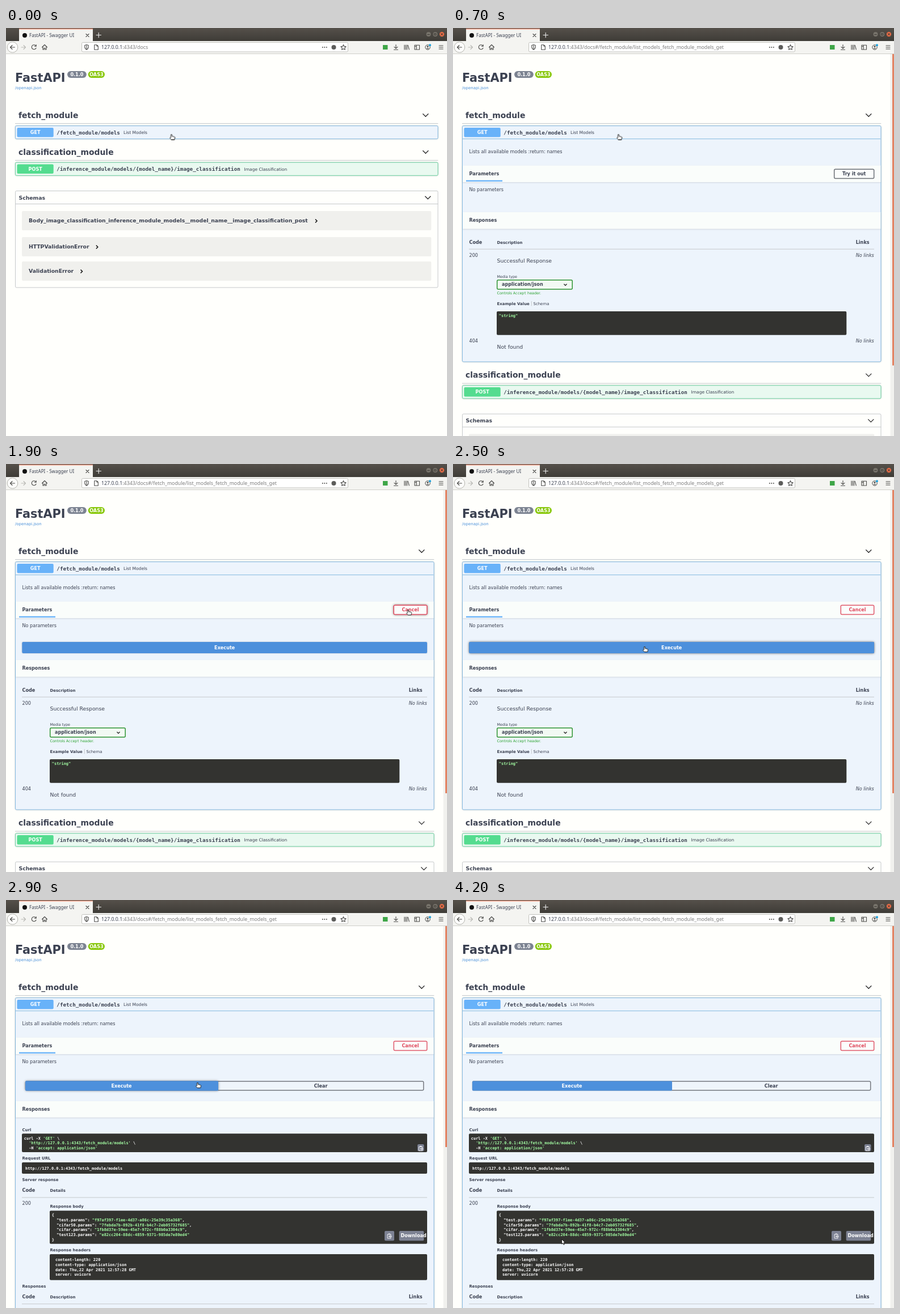
An HTML page that plays this animation: 777 by 720 pixels, repeating every 4400 ms.

```html
<!DOCTYPE html>
<html lang="en">
<head>
<meta charset="utf-8">
<title>API docs</title>
<style>
html, body { margin: 0; width: 100%; height: 100%; overflow: hidden; background: #fffffc; }
svg { display: block; width: 777px; height: 720px; }
text { font: 8.1px "DejaVu Sans", sans-serif; fill: #3b4151; white-space: pre; }
.b { font-weight: bold; }
.i { font-style: italic; }
.m { font-family: "DejaVu Sans Mono", monospace; font-weight: bold; }
.c { text-anchor: middle; }
.ui { font-family: "Noto Sans", "Open Sans", sans-serif; }
.w { fill: #fff; }
.g { fill: #a2fca2; }
.dim { fill: #7d7d7d; }
.link { fill: #4a90d9; }
.red { fill: #e0485c; }
.ok { fill: #27a02b; }
.line { fill: none; stroke: #2b2b2b; stroke-width: 1.3; }
.icon { fill: none; stroke: #4a4a48; stroke-width: 1.1; stroke-linecap: round; stroke-linejoin: round; }
.soft { filter: drop-shadow(0 0 1px rgba(0,0,0,.2)); }
.band { filter: drop-shadow(0 1px 1px rgba(0,0,0,.12)); }
.hover { filter: drop-shadow(0 0 2px rgba(0,0,0,.45)); }
.timed { animation: 4400ms step-end infinite; }
#hand, #arrow { fill: #fff; stroke: #111; stroke-width: .9; stroke-linejoin: round; }
</style>
</head>
<body>
<svg id="stage" viewBox="0 0 777 720" xmlns="http://www.w3.org/2000/svg"></svg>
<script>
const LOOP = 4400;
const INK = '#3b4151', RULE = '#c5c8cb', DARK = '#333330', SLATE = '#7d8293';
const GET = { box: '#edf4fc', edge: '#83b9e0', tag: '#68b2f9' };
const POST = { box: '#e9f9f0', edge: '#6bcfa0', tag: '#54dc8f' };
let css = '';

// Keyframes from [time, declarations] pairs, held until the next one
function keys(name, steps) {
  const rows = steps.map(([t, rule]) => `${Math.max(0, t - .01) / LOOP * 100}%{${rule}}`);
  css += `@keyframes ${name}{${rows.join('')}}`;
  return `class="timed" style="animation-name:${name}"`;
}
let count = 0;
function during(from, to, body) {
  const steps = [[from, 'visibility:visible'], [to, 'visibility:hidden']];
  if (from) steps.unshift([0, 'visibility:hidden']);
  return `<g ${keys('show' + count++, steps)}>${body}</g>`;
}
const text = (x, y, s, size = 8.1, cls = '') =>
  `<text x="${x}" y="${y}" class="${cls}" style="font-size:${size}px">${s}</text>`;
const span = (cls, s) => `<tspan class="${cls}">${s}</tspan>`;
const box = (x, y, x2, y2, fill, edge = 'none', rx = 0, cls = '', sw = 1) =>
  `<rect x="${x}" y="${y}" width="${x2 - x}" height="${y2 - y}" rx="${rx}" fill="${fill}" stroke="${edge}" stroke-width="${sw}" class="${cls}"/>`;
const path = (d, cls = 'line', extra = '') => `<path d="${d}" class="${cls}" ${extra}/>`;
const rule = (x, x2, y, color = RULE) => path(`M${x} ${y}H${x2}`, '', `stroke="${color}"`);
const dot = (x, y, r, fill, extra = '') => `<circle cx="${x}" cy="${y}" r="${r}" fill="${fill}" ${extra}/>`;
const shift = (y, body) => `<g transform="translate(0 ${y})">${body}</g>`;
const down = (x, y, r = 5) => path(`M${x - r} ${y - r / 2}l${r} ${r} ${r} ${-r}`);
const right = (x, y) => path(`M${x - 1.5} ${y - 3}l3 3-3 3`, 'line', 'style="stroke:#111;stroke-width:1.5"');

function chrome() {
  const tools = [
    'M15.5 34H8M11 30.5L7.5 34 11 37.5',
    'M52.6 31.5A4 4 0 1 0 53 35.2M53.2 29.5V32.3H50.3',
    'M63.5 34L68 29.5 72.5 34M65 33.5V38H67V35.5H69V38H71V33.5',
    'M138.8 30.5L142 29.5 145.2 30.5V33.5Q145 36.8 142 38.3 139 36.8 138.8 33.5ZM142 31V36.8',
    'M155.8 29.8H160L162.3 32V38.2H155.8ZM160 29.8V32H162.3',
    'M594.5 29.5l1.4 2.9 3.2.4-2.3 2.2.6 3.2-2.9-1.5-2.9 1.5.6-3.2-2.3-2.2 3.2-.4z',
    'M687 29.5V36M684 33.3L687 36.2 690 33.3M683.5 38.3H690.5',
    'M702 30V38M704.3 30V38M706.6 30V38M708.2 30.3L710.3 38',
    'M720 30.2H728.5V38H720ZM723.2 30.2V38M720.5 32.5H722.5',
    'M763 31H770M763 34H770M763 37H770'
  ];
  return '<defs><linearGradient id="bar" x2="0" y2="1"><stop stop-color="#55504a"/><stop offset="1" stop-color="#3d3b36"/></linearGradient></defs>'
    + box(0, 0, 777, 24, 'url(#bar)')
    + box(0, 23, 777, 45.5, '#f4f4f1') + rule(0, 777, 45.5, '#cfcfca')
    + box(23, 1, 153, 25, '#f4f4f1') + box(23, 1, 153, 2.5, '#ec9a83')
    + dot(33, 13, 4, '#111') + text(41, 16, 'FastAPI - Swagger UI', 8.1, 'ui')
    + path('M141 10.5l5 5M146 10.5l-5 5', 'icon')
    + path('M159 12.5H167.5M163.2 8.3V16.7', 'icon', 'style="stroke:#eee"')
    + dot(744.5, 11, 4, '#77736b') + dot(756.3, 11, 4, '#77736b') + dot(768, 11, 4.2, '#df6a47')
    + path('M742.7 11.5H746.3M754.8 9.7H757.8V12.5H754.8ZM766.5 9.5l3 3M769.5 9.5l-3 3', 'icon', 'style="stroke:#37342f;stroke-width:.9"')
    + dot(11.5, 34, 9.3, '#fdfdfb', 'stroke="#b4b4af"')
    + box(133.5, 25.5, 602.5, 42, '#fff', '#c3c3be', 2)
    + tools.map(d => path(d, 'icon')).join('')
    + path('M27 34H34.5M31 30.5L34.5 34 31 37.5', 'icon', 'style="stroke:#b9b9b5"')
    + [557.8, 561.3, 564.8].map(x => dot(x, 34, 1, '#4a4a48')).join('')
    + dot(577.5, 34, 4, '#5c5c5a')
    + box(664, 30, 672.5, 38, '#3fa648')
    + dot(743, 34, 4.2, 'none', 'stroke="#4a4a48"') + dot(743, 32.8, 1.5, '#4a4a48')
    + path('M740.3 36.8Q743 33.8 745.7 36.8Z', '', 'fill="#4a4a48"') + dot(747, 30.2, 2, '#1aa0dc');
}

const url = tail => text(168, 37.2, '127.0.0.1' + span('dim', ':4343/docs' + tail), 8.8, 'ui');

function title() {
  return text(16, 94.8, 'FastAPI', 20.85, 'b')
    + box(108, 76, 141.8, 88, '#7d8492', 'none', 6) + text(124.9, 85.1, '0.1.0', 8.1, 'b c w')
    + box(144.7, 76, 174, 88, '#89c80c', 'none', 6) + text(159.4, 85.1, 'OAS3', 8.1, 'b c w')
    + text(16, 108.4, '/openapi.json', 6.95, 'link');
}

function section(y, name, edge) {
  return text(22, y, name, 13.92, 'b') + down(edge - 22, y - 5) + rule(16, edge, y + 9.7);
}

function operation(y, end, edge, kind, verb, route, about, aboutX) {
  return box(16.5, y, edge - .3, end, kind.box, kind.edge, 2, 'soft')
    + box(19.5, y + 3.3, 83.7, y + 19.8, kind.tag, 'none', 2)
    + text(51.7, y + 14.5, verb, 8.1, 'b c w')
    + text(89.3, y + 14.8, route, 9.27, 'm') + text(aboutX, y + 14.4, about, 7.53);
}

function head(edge, end) {
  return section(158.8, 'fetch_module', edge)
    + operation(172.7, end, edge, GET, 'GET', '/fetch_module/models', 'List Models', 207)
    + (end > 200 ? rule(17, edge - 1, 195.7, GET.edge) : '');
}

function lower(dy, edge) {
  const models = [
    [323, 'Body_image_classification_inference_module_models__model_name__image_classification_post', 546.5],
    [369, 'HTTPValidationError', 160.3],
    [412, 'ValidationError', 133]
  ];
  return shift(dy, section(223.8, 'classification_module', edge)
    + operation(237.2, 260.3, edge, POST, 'POST', '/inference_module/models/{model_name}/image_classification', 'Image Classification', 419.5)
    + box(16.5, 287.5, edge - .3, 458, 'none', RULE, 2) + rule(17, edge, 310.5)
    + text(22.5, 302.6, 'Schemas', 9.27, 'b') + down(edge - 18, 299.3)
    + models.map(([y, name, x]) => box(28, y, edge - 12, y + 34, '#f0f0ed', 'none', 2)
      + text(40, y + 20.3, name, 9.27, 'b') + right(x, y + 17.5)).join(''));
}

const band = (y, y2) => box(17, y, 753.5, y2, '#fafdfb', 'none', 0, 'band');
const button = (x, label, edge, cls) => box(x, 249.2, 741.7, 265.5, '#fbfdfc', edge, 2, '', 1.5)
  + text((x + 741.7) / 2, 260, label, 8.1, 'b c ' + cls);
const scroll = end => box(770.5, 46, 777, 720, '#f1f1ee') + box(774, 46, 777, end, '#e38363');

function details() {
  return text(28.5, 220.5, 'Lists all available models :return: names')
    + band(242.7, 272) + text(28.5, 259.7, 'Parameters', 8.1, 'b')
    + box(23, 268.6, 87, 270.9, GET.tag) + text(28.5, 288, 'No parameters');
}

function columns(y) {
  return text(28.5, y, 'Code', 8.1, 'b') + text(77.5, y - .1, 'Description', 6.95, 'b')
    + text(709.7, y, 'Links', 8.1, 'b') + rule(28, 742, y + 9.5);
}

function responses(dy) {
  return shift(dy, band(325, 354.5) + text(28.5, 342, 'Responses', 8.1, 'b') + columns(380.7)
    + text(28.5, 403.6, '200') + text(709.7, 403.6, 'No links', 8.1, 'i')
    + text(77.5, 414, 'Successful Response', 9.27)
    + text(77.5, 441.3, 'Media type', 6.4)
    + box(77.7, 444.8, 210.2, 461, '#f2f9f3', '#2f9433', 2, '', 1.5)
    + text(86, 455.4, 'application/json', 8.1, 'b') + down(198, 453, 2.6)
    + text(77.5, 470.3, 'Controls ' + span('m ok" style="font-weight:400', 'Accept') + ' header.', 6.4, 'ok')
    + text(77.5, 488.8, 'Example Value', 6.95, 'b') + path('M138.3 482V490.5', '', `stroke="${RULE}"`)
    + text(141.5, 488.8, 'Schema', 6.95)
    + box(77, 500, 693.3, 541.7, DARK, 'none', 2) + text(80.8, 510, '"string"', 6.95, 'm g')
    + text(28.5, 555, '404') + text(709.7, 555, 'No links', 8.1, 'i') + text(77.5, 565.6, 'Not found', 9.27));
}

const code = (x, y, lines) => lines.map((s, i) => text(x, y + i * 8.7, s, 6.95, 'm w')).join('');
const clip = (x, y) => path(`M${x - 3} ${y - 3}H${x + 2.5}V${y + 4}H${x - 3}ZM${x - 1.3} ${y - 4}H${x + .8}M${x + 4} ${y + .7}H${x - .7}M${x + .7} ${y - .8}L${x - .9} ${y + .7} ${x + .7} ${y + 2.2}`, 'icon', 'style="stroke:#fff;stroke-width:.9"');

function buttons() {
  const stops = [[2700, 150], [2800, 292], [2900, 374], [3000, 386]];
  const grow = keys('grow', [[0, 'width:116px'], ...stops.map(([t, x]) => [t, `width:${x - 34}px`])]);
  const slide = keys('slide', stops.map(([t, x], i) => [i ? t : 0, `transform:translateX(${(x - 386) / 2}px)`]));
  return box(34.5, 320, 735.7, 335.7, '#eff5fb', '#74787f', 2, '', 1.5)
    + during(2700, 3200, box(34, 319.5, 374, 336.3, '#4d90dc', 'none', 2, 'hover'))
    + `<rect x="34" y="319.4" height="17" rx="1.5" fill="#4d90dc" ${grow}/>`
    + `<g ${slide}>${text(209.5, 330.7, 'Execute', 8.1, 'b c w')}${text(560.7, 330.7, 'Clear', 8.1, 'b c')}</g>`;
}

function result() {
  const entry = (key, id, end = ',') => `  "${key}": ` + span('g', `"${id}"`) + end;
  return buttons() + band(355, 383.7) + text(28.5, 371.5, 'Responses', 8.1, 'b')
    + text(28.5, 407.5, 'Curl', 6.95, 'b') + box(28, 412.3, 742, 445, DARK, 'none', 2)
    + code(31.8, 422.7, [
      'curl -X ' + span('g', "'GET'") + ' \\',
      '  ' + span('g', "'http://127.0.0.1:4343/fetch_module/models'") + ' \\',
      '  -H ' + span('g', "'accept: application/json'")])
    + box(725, 431, 736.5, 443.3, SLATE, 'none', 2) + clip(731, 438.5)
    + text(28.5, 458, 'Request URL', 6.95, 'b') + box(28, 463, 742, 483, DARK, 'none', 2)
    + code(34, 475.5, ['http://127.0.0.1:4343/fetch_module/models'])
    + text(28.5, 495.7, 'Server response', 6.95, 'b')
    + text(28.5, 515, 'Code', 8.1, 'b') + text(77.5, 514.8, 'Details', 6.95, 'b') + rule(28, 742, 525)
    + text(28.5, 538.3, '200') + text(77.5, 543.3, 'Response body', 6.95, 'b')
    + box(77, 548.2, 742, 606.7, DARK, 'none', 2)
    + code(80.8, 558.3, ['{',
      entry('test.params', 'f97af397-f1ee-4d37-a86c-25e39c35a368'),
      entry('cifar50.params', '7febda7b-892b-41f8-b4c7-2eb05732f685'),
      entry('cifar.params', '1fb8d37e-59ee-45e7-972c-f88b0a3304c9'),
      entry('test123.params', 'e82cc204-88dc-4859-9371-985de7e80ed4', ''),
      '}'])
    + box(667, 584, 684, 601.3, SLATE, 'none', 2) + clip(675.5, 593)
    + box(692.7, 584, 736.3, 601.3, SLATE, 'none', 2) + text(695.6, 594.6, 'Download', 8.1, 'b w')
    + text(77.5, 620, 'Response headers', 6.95, 'b') + box(77, 625, 742, 670.7, DARK, 'none', 2)
    + code(87, 637.3, ['content-length: 220', 'content-type: application/json',
      'date: Thu,22 Apr 2021 12:57:28 GMT', 'server: uvicorn'])
    + text(28.5, 683.8, 'Responses', 6.95, 'b') + columns(703.3);
}

function cursor() {
  const HAND = 'hand', ARROW = 'arrow';
  const route = [
    [0, 291.5, 187.5, HAND], [1000, 300, 190, HAND], [1100, 345, 222, ARROW], [1200, 430, 262, ARROW],
    [1300, 540, 283, ARROW], [1400, 640, 281, ARROW], [1500, 693, 270, ARROW], [1600, 708.5, 257, HAND],
    [2200, 690, 268, ARROW], [2300, 560, 290, ARROW], [2400, 400, 316, HAND], [2500, 337.5, 322, HAND],
    [3200, 326, 337, ARROW], [3300, 290, 395, ARROW], [3400, 245, 480, ARROW], [3500, 212, 550, ARROW],
    [3600, 196, 586, ARROW], [3700, 192, 596, ARROW], [3800, 192, 597, ARROW], [4200, 191, 598, ARROW]
  ];
  const move = keys('move', route.map(([t, x, y]) => [t, `transform:translate(${x}px,${y}px)`]));
  const swap = kind => keys('swap-' + kind, route.map(([t, , , k]) => [t, `visibility:${k === kind ? 'visible' : 'hidden'}`]));
  return `<g ${move}>`
    + `<path id="hand" d="M-1 .8Q0-.3 1 .8V3.6L4.8 4.3Q6.1 4.7 6 6L5.3 9.5H-.3L-3 6.4Q-3-.1 5.2-1 6Z" ${swap(HAND)}/>`.replace('Q-3-.1 5.2-1 6', 'Q-2.4 5-1 6')
    + `<path id="arrow" d="M.5.5V9L2.5 7.3 4 10.4 5.4 9.7 4 6.8H6.6Z" ${swap(ARROW)}/></g>`;
}

document.getElementById('stage').innerHTML = chrome()
  + during(0, 600, url('')) + during(600, LOOP, url('#/fetch_module/list_models_fetch_module_models_get'))
  + title()
  + during(0, 600, head(761.3, 195.7) + lower(0, 761.3))
  + during(600, 700, head(761.3, 294) + lower(98.2, 761.3) + box(774, 46, 777, 52.5, '#e38363')
    + path('M382.3 233.3A6.7 6.7 0 1 0 389 226.6', '', 'fill="none" stroke="#555a60" stroke-width="2"'))
  + during(700, 1900, head(754.3, 589) + details() + button(671.7, 'Try it out', '#6b6f76', '')
    + responses(0) + lower(393.6, 754.3) + scroll(595.5))
  + during(1600, 1900, box(671.7, 249.2, 741.7, 265.5, '#fbfdfc', '#6b6f76', 2, 'hover', 1.5) + text(706.7, 260, 'Try it out', 8.1, 'b c'))
  + during(1900, 2700, head(754.3, 610) + details()
    + box(28.3, 314, 742, 334, '#4d90dc', 'none', 2, 'soft') + text(385.2, 326.5, 'Execute', 8.1, 'b c w')
    + responses(21) + lower(414.6, 754.3) + scroll(581))
  + during(1900, 2200, box(683.3, 249.2, 741.7, 265.5, '#fbfdfc', '#e0596b', 2, 'hover', 1.5))
  + during(2400, 2700, box(28.3, 314, 742, 334, '#4d90dc', 'none', 2, 'hover') + text(385.2, 326.5, 'Execute', 8.1, 'b c w'))
  + during(2700, LOOP, head(754.3, 740) + details() + result() + scroll(436))
  + during(1900, LOOP, button(683.3, 'Cancel', '#e0596b', 'red'))
  + cursor();
document.head.appendChild(document.createElement('style')).textContent = css;
</script>
</body>
</html>
```
